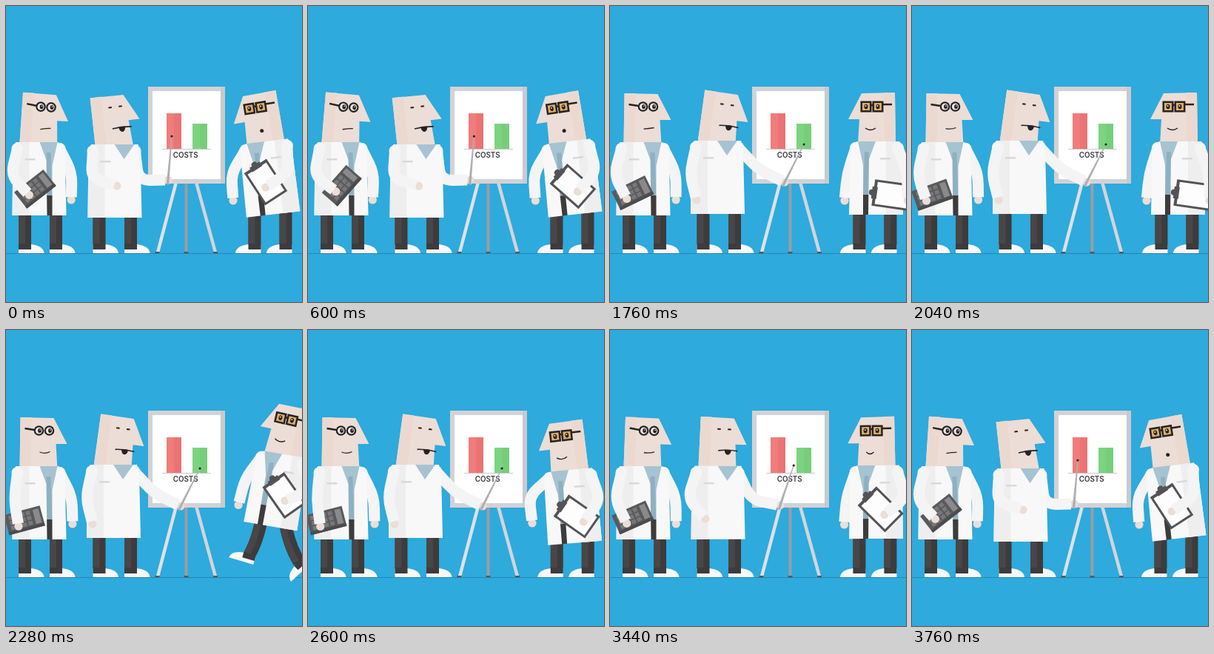
An HTML page with a canvas for the animation above (3.8 s loop, 400 by 400 pixels).

```html
<!DOCTYPE html>
<html>
<head>
<meta charset="utf-8">
<style>
html, body { margin: 0; width: 100%; height: 100%; overflow: hidden; background: #2eaadc; }
canvas { display: block; width: 400px; height: 400px; }
</style>
</head>
<body>
<canvas id="stage" width="400" height="400"></canvas>
<script>
const ctx = document.getElementById('stage').getContext('2d');
const LOOP = 3800;
const INK = '#262324', SKIN = '#ecddd6', SKIN_SHADE = '#ebd9d0', COAT = '#f8f8f9', COAT_SHADE = '#eeeeef',
  SLEEVE = '#f4f4f5', SHIRT = '#a6c3d1', TROUSERS = '#3d3b3c', TROUSERS_LIGHT = '#484647';

const mix = (a, b, k) => a + (b - a) * k;
const mixPoint = (a, b, k) => a.map((v, i) => mix(v, b[i], k));
const ease = k => (1 - Math.cos(Math.PI * Math.min(1, Math.max(0, k)))) / 2;
const bump = (t, center, reach) => ease(1 - Math.abs(t - center) / reach);

// Eases through [time, value] stops
function track(t, ...stops) {
  return stops.reduce((value, [time, next], i) =>
    i ? mix(value, next, ease((t - stops[i - 1][0]) / (time - stops[i - 1][0]))) : next, 0);
}

function poly(fill, ...points) {
  ctx.beginPath();
  points.forEach(p => ctx.lineTo(...p));
  ctx.closePath();
  ctx.fillStyle = fill;
  ctx.fill();
}
function rect(fill, x, y, w, h) {
  ctx.fillStyle = fill;
  ctx.fillRect(x, y, w, h);
}
function oval(fill, x, y, rx, ry = rx, end = 2 * Math.PI) {
  ctx.beginPath();
  ctx.ellipse(x, y, rx, ry, 0, 0, end);
  ctx.fillStyle = fill;
  ctx.fill();
}
function curve(color, width, from, ctrl, to) {
  ctx.beginPath();
  ctx.moveTo(...from);
  ctx.quadraticCurveTo(...ctrl, ...to);
  ctx.strokeStyle = color;
  ctx.lineWidth = width;
  ctx.stroke();
}
const line = (color, width, a, b) => curve(color, width, a, a, b);

function placed([x, y], degrees, face, draw) {
  ctx.save();
  ctx.translate(x, y);
  ctx.rotate(degrees * Math.PI / 180);
  ctx.scale(face, 1);
  draw();
  ctx.restore();
}

function drawBoard() {
  line('#dfe1e4', 4.5, [230, 238], [205, 333]);
  line('#9b9da3', 4, [243.5, 238], [243.5, 333]);
  line('#d3d5d9', 4.5, [257, 238], [283, 333]);
  for (const x of [204.5, 243.5, 283]) rect('#57585c', x - 3, 332, 6, 2.5);
  rect('#d2d2d7', 192, 109, 104, 131);
  rect('#c9c9ce', 290, 109, 6, 131);
  rect('#fff', 198, 115, 92, 119);
  rect('#f07d7c', 217, 145, 20, 48);
  rect('#ea7473', 227, 145, 10, 48);
  rect('#7dd480', 252, 159, 20, 34);
  rect('#76ce7a', 262, 159, 10, 34);
  line('#c9c9cc', 1, [211, 193.5], [277, 193.5]);
  ctx.fillStyle = '#39383b';
  ctx.font = '600 9.8px Inter, sans-serif';
  ctx.textAlign = 'center';
  ctx.fillText('COSTS', 242.7, 205.3);
}

function drawLeg(hip, foot, tilt, face) {
  const ctrl = [mix(hip[0], foot[0], .25), mix(hip[1], foot[1], .6)];
  const left = p => [p[0] - 4, p[1]];
  curve(TROUSERS, 17, hip, ctrl, foot);
  curve(TROUSERS_LIGHT, 9, left(hip), left(ctrl), left(foot));
  placed(foot, tilt, face, () => {
    ctx.beginPath();
    ctx.moveTo(-8.5, 0);
    ctx.lineTo(8.5, 0);
    ctx.quadraticCurveTo(25, 2, 26, 12);
    ctx.lineTo(-8.5, 12);
    ctx.fillStyle = '#f8f8f8';
    ctx.fill();
    rect(TROUSERS, -8.5, -1, 17, 8);
  });
}

// Two equal bones; bend is the side the elbow points to
function drawArm(shoulder, hand, bone, bend) {
  const dx = hand[0] - shoulder[0], dy = hand[1] - shoulder[1], d = Math.hypot(dx, dy);
  const out = bend * Math.sqrt(Math.max(0, bone * bone - d * d / 4)) / d;
  const elbow = [shoulder[0] + dx / 2 - dy * out, shoulder[1] + dy / 2 + dx * out];
  oval(SKIN, ...hand, 5.6);
  oval(SLEEVE, ...shoulder, 8);
  ctx.beginPath();
  ctx.moveTo(...shoulder);
  ctx.lineTo(...mixPoint(shoulder, elbow, .6));
  ctx.quadraticCurveTo(...elbow, ...mixPoint(elbow, hand, .4));
  ctx.lineTo(...mixPoint(elbow, hand, .9));
  ctx.strokeStyle = SLEEVE;
  ctx.lineWidth = 15;
  ctx.stroke();
}

function drawHead(drawFace) {
  poly(SKIN, [-24, -66], [21, -65], [39, -30], [24, -30], [26, 4], [-25, 4]);
  poly(SKIN_SHADE, [-24, -66], [-9, -66], [-10, 4], [-25, 4]);
  drawFace();
}

function drawCoat(open) {
  if (open) {
    rect(SHIRT, 1, 0, 25, 73);
    poly('#8fb0c1', [11, 14], [17, 14], [19, 73], [10, 73]);
    rect(TROUSERS, 8, 72, 16, 27);
    poly(COAT, [26, 0], [33, 2], [36, 12], [38, 99], [19, 99], [19, 32]);
    poly(COAT, [-30, 0], [2, 0], [11, 24], [12, 99], [-35, 99], [-34, 8]);
  } else {
    poly(COAT, [-30, 0], [33, 0], [36, 12], [38, 99], [-35, 99], [-34, 8]);
    poly(SHIRT, [1, 0], [28, 0], [14, 20]);
  }
  poly(COAT_SHADE, [-30, 0], [-12, 0], [-12, 99], [-35, 99], [-34, 8]);
  rect('#d9d9dc', -18, 22, 14, 2.5);
}

function drawPerson({ face, neck, headTilt, bodyTilt = 0, open, backHand, frontHand, frontBone, frontBend, drawFace, drawProp }) {
  const angle = bodyTilt * Math.PI / 180, cos = Math.cos(angle), sin = Math.sin(angle);
  const shoulder = x => [neck[0] + face * x * cos - 9 * sin, neck[1] + face * x * sin + 9 * cos];
  drawArm(shoulder(29), frontHand, frontBone, frontBend);
  placed(neck, headTilt, face, () => drawHead(drawFace));
  placed(neck, bodyTilt, face, () => drawCoat(open));
  if (drawProp) drawProp();
  drawArm(shoulder(-28), backHand, 36.5, face);
}

function drawCalculator() {
  rect('#59595c', -14, -25, 28, 50);
  rect('#4b4b4e', 10, -25, 4, 50);
  rect('#8a8a8d', -11, -22, 20, 8);
  for (let i = 0; i < 12; i++) rect('#78787b', -11 + i % 3 * 7, -10 + (i / 3 | 0) * 8, 5.5, 6);
}

function drawClipboard() {
  rect('#535357', -18, -26, 36, 52);
  rect('#fdfdfd', -15, -22, 30, 45);
  rect('#535357', -8, -28, 16, 7);
  oval('#535357', 0, -28, 4);
}

function roundGlassesFace(mood) {
  line(INK, 2.5, [-18, -51], [-5, -49]);
  for (const x of [1, 15]) {
    oval(INK, x, -48, 6.8);
    oval('#eee7e3', x, -48, 4.6);
    oval(INK, x + 1, -48, 2.4, 3);
    oval('#fff', x + 1.5, -49, .8);
  }
  curve(INK, 1.3, [2, -18 - mood], [9, -18 + mood * 2], [16, -19.5]);
}

function talkingFace(open) {
  for (const x of [1, 15]) line(INK, 2, [x - 2, -50], [x + 2.5, -50]);
  curve(INK, 1.7, [1, -21], [14, -26 + open * 3], [27, -21]);
  if (open > .05) oval(INK, 14, -22.5, 4.5, 7 * open, Math.PI);
}

function squareGlassesFace(smile) {
  line(INK, 2.5, [-20, -50], [-7, -50]);
  for (const x of [-1, 15]) {
    rect(INK, x - 7.5, -54.5, 15, 15);
    rect('#dfae66', x - 5, -52, 10, 10);
    oval(INK, x, -47, 2.5, 3.3);
    oval('#fff', x + .4, -48, .9);
  }
  line(INK, 2.5, [6, -49], [8, -49]);
  if (smile < .4) oval(INK, 3, -15, 2.5);
  else curve(INK, 1.4, [9 - 7 * smile, -18], [9, -13], [9 + 7 * smile, -18]);
}

function drawAccountant(t) {
  const spin = track(t, [200, 52], [1120, 25], [1760, 64], [2280, 75], [3220, 77], [3700, 52]);
  const nod = track(t, [300, 3], [1120, 6], [1760, 0], [3220, 0], [3700, 3]);
  const mood = track(t, [300, -.6], [1760, -.2], [2280, 1], [3220, 1], [3700, -.6]);
  const calc = [64 - spin * .52 + nod * .8, 225 + spin * .43];
  drawPerson({
    face: 1, neck: [43.5, 184], headTilt: nod, open: true,
    backHand: [calc[0] - 8, calc[1] + 8], frontHand: [84 + spin * .08, 262], frontBone: 36.5, frontBend: -1,
    drawFace: () => roundGlassesFace(mood),
    drawProp: () => placed(calc, spin, 1, drawCalculator)
  });
}

function drawSpeaker(t) {
  const turn = track(t, [540, 0], [1500, 1], [3260, 1], [3700, 0]);
  const hand = mixPoint([219, 235], [236, 238], turn), tip = mixPoint([224, 176], [262, 187], turn);
  drawPerson({
    face: 1, neck: mixPoint([145.5, 187], [144, 182], turn), headTilt: mix(-7, 7, turn), open: false,
    backHand: mixPoint([150, 243], [117, 262], turn), frontHand: hand, frontBone: 40, frontBend: 1,
    drawFace: () => talkingFace(1 - bump(t, 1120, 350))
  });
  const [x, y] = mixPoint(hand, tip, -.1);
  poly('#aeb0b4', [x - 1.8, y], [x + 1.8, y + .6], [tip[0] + .6, tip[1]], [tip[0] - .6, tip[1]]);
  oval(INK, ...tip, 1.6);
}

function drawListener(t) {
  const hop = bump(t, 2320, 270), crouch = bump(t, 2600, 220);
  const x = track(t, [480, 351], [1120, 355], [1760, 361], [2060, 361], [2320, 376], [2600, 354],
    [2850, 361], [3400, 361], [3700, 351]);
  const y = 183 - 16 * hop + 6 * crouch, tilt = (x - 361) * .9;
  const drop = track(t, [200, 0], [1120, 39], [1760, 49], [2060, 49], [2280, 2], [2600, 22], [3250, 20], [3700, 0]);
  const board = [x + drop * .42, y + 55 + drop * .36];
  const smile = track(t, [1120, 0], [1760, 1], [3300, 1], [3700, 0]);
  const sway = (x - 361) * .1 * (1 - hop);

  const leg = (standX, liftedHip, liftedFoot, footTilt) => drawLeg(
    mixPoint([standX + sway, 268], liftedHip, hop), mixPoint([standX + sway, 322], liftedFoot, hop), footTilt * hop, -1);
  leg(337, [348, 240], [329, 302], 17);
  leg(379, [376, 252], [397, 313], -45);
  drawPerson({
    face: -1, neck: [x, y], headTilt: tilt, bodyTilt: tilt * .75, open: true,
    backHand: [board[0] + drop * .42, board[1] + 7],
    frontHand: [x - 44 - 18 * hop - 7 * crouch, y + 80 - 12 * hop - 8 * crouch], frontBone: 36.5, frontBend: 1,
    drawFace: () => squareGlassesFace(smile),
    drawProp: () => placed(board, -33 - drop, 1, drawClipboard)
  });
}

function frame() {
  const t = performance.now() % LOOP;
  rect('#2eaadc', 0, 0, 400, 400);
  line('#2687b4', 1, [0, 334.5], [400, 334.5]);
  drawBoard();
  for (const x of [25.5, 67.5, 126, 168.5]) drawLeg([x, 272], [x, 322], 0, 1);
  drawAccountant(t);
  drawSpeaker(t);
  drawListener(t);
  requestAnimationFrame(frame);
}
frame();
</script>
</body>
</html>
```
